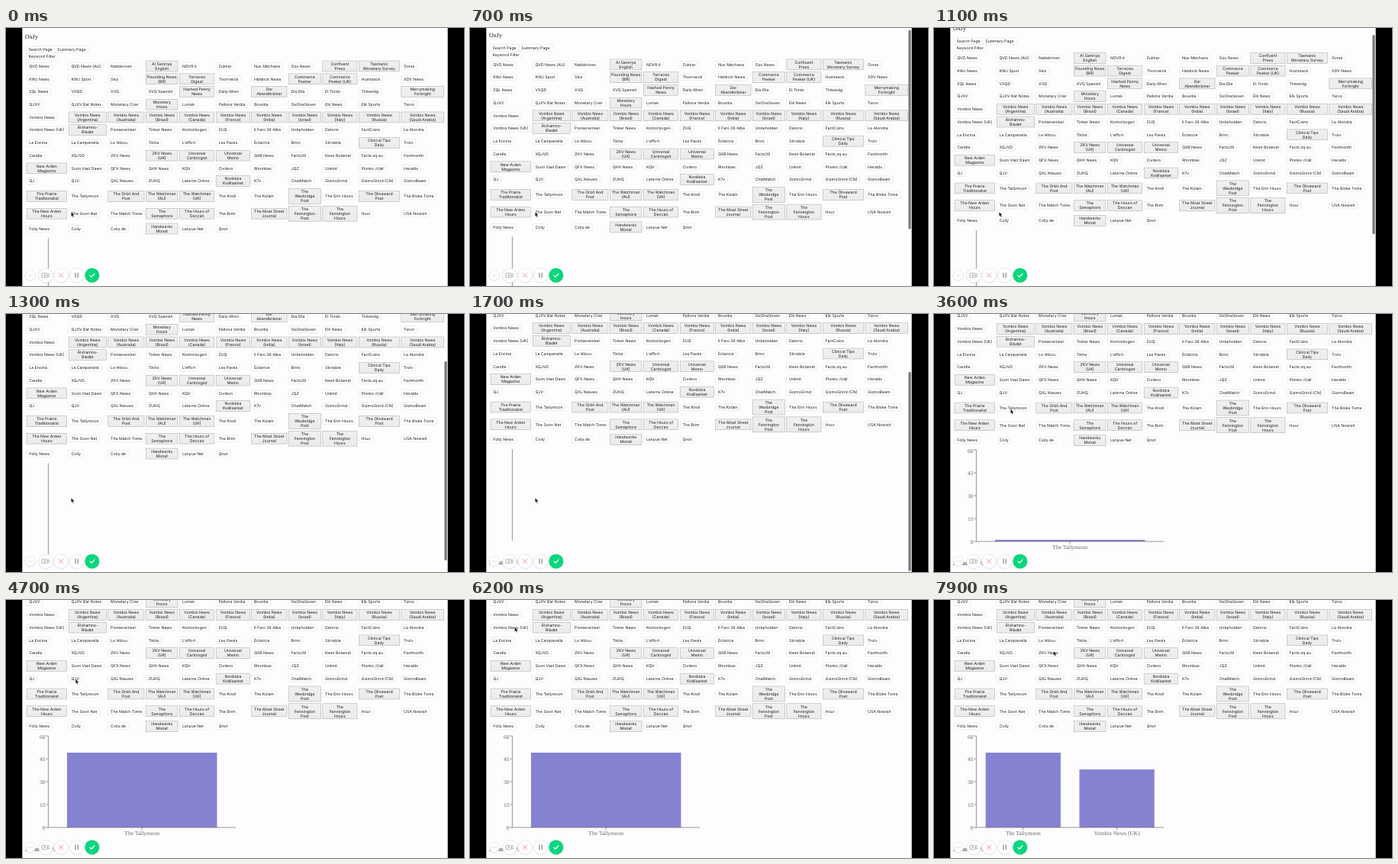
An HTML page that plays this animation: 600 by 338 pixels, repeating every 8 s.

```html
<!DOCTYPE html>
<html lang="en">
<head>
<meta charset="utf-8">
<title>News source chart</title>
<style>
  html, body { margin: 0; width: 100%; height: 100%; overflow: hidden; background: #000; }
  svg { display: block; width: 100%; height: 100%; }
  text { text-rendering: geometricPrecision; }
  .ui { font: 5.2px Inter, Roboto, sans-serif; fill: #1c1c1c; }
  .serif { font: 8px "Liberation Serif", "Noto Serif", serif; fill: #111; }
  .label { font: 7.5px "Liberation Serif", "Noto Serif", serif; fill: #666; }
  .mid { text-anchor: middle; }
  .end { text-anchor: end; }
  .flat { fill: #fff; stroke: #dadadc; stroke-width: .5; }
  .flat.pressed { fill: #8fbdf8; stroke: #6ba4ee; }
  .block { fill: url(#grey); stroke: #b2b2b4; stroke-width: .6; }
  .axis { stroke: #666; stroke-width: .7; fill: none; }
  .bar { fill: #8682d2; }
  .disc { fill: #fff; stroke: #dadade; stroke-width: .6; }
  .icon { fill: none; stroke: #8c8c8c; stroke-width: .8; stroke-linecap: round; stroke-linejoin: round; }
</style>
</head>
<body>
<svg viewBox="0 0 600 338" preserveAspectRatio="none">
  <defs>
    <linearGradient id="grey" x2="0" y2="1">
      <stop stop-color="#f0f0f1"/><stop offset="1" stop-color="#ebebed"/>
    </linearGradient>
    <clipPath id="view"><rect x="21.3" width="557.4" height="338"/></clipPath>
  </defs>
  <rect width="600" height="338"/>
  <g clip-path="url(#view)">
    <rect x="21" width="558" height="338" fill="#fdfcfe"/>
    <g id="page">
      <text class="serif" x="25" y="14">OxJy</text>
      <g id="buttons"></g>
      <path class="axis" d="M55.4 275.5v120"/>
      <g id="chart"></g>
      <text class="serif" x="25" y="426">Summary Page</text>
    </g>
    <rect id="thumb" x="574.4" width="3.2" height="261" rx="1.6" fill="#77777a"/>
  </g>
  <g id="toolbar">
    <g fill="#000" opacity=".05">
      <circle cx="32" cy="324.6" r="7.2"/><circle cx="52" cy="324.6" r="10.1"/><circle cx="72.2" cy="324.6" r="10.1"/>
      <circle cx="92.6" cy="324.6" r="10.1"/><circle cx="112.8" cy="324.6" r="10.1"/>
    </g>
    <circle class="disc" cx="32" cy="324" r="6.6"/>
    <circle class="disc" cx="52" cy="324" r="9.4"/>
    <circle class="disc" cx="72.2" cy="324" r="9.4"/>
    <circle class="disc" cx="92.6" cy="324" r="9.4"/>
    <circle cx="112.8" cy="324" r="9.5" fill="#08d67d"/>
    <path class="icon" d="M29.8 324h0M32 324h0M34.2 324h0"/>
    <path class="icon" style="stroke-width:.6" d="M47.4 321.2h6.4v5.6h-6.4zM53.8 323.4l2.8-1.6v4.4l-2.8-1.6M49.4 324h2.4m-1.2-1.2v2.4"/>
    <path class="icon" style="stroke:#f0787a" d="M69.4 321.2l5.6 5.6m0-5.6l-5.6 5.6"/>
    <path class="icon" style="stroke-width:1.3" d="M91 321.2v5.6m3.2-5.6v5.6"/>
    <path class="icon" style="stroke:#fff;stroke-width:1.3" d="M109.8 324.1l2.1 2.1 4-4.2"/>
  </g>
  <path id="cursor" d="M0 0v6l1.4-1.3 1 2.2 1.1-.5-1-2.1h1.8z" fill="#000" stroke="#fff" stroke-width=".4"/>
</svg>
<script>
const $ = id => document.getElementById(id);

function add(parent, tag, attrs, content) {
  const el = document.createElementNS("http://www.w3.org/2000/svg", tag);
  for (const key in attrs) el.setAttribute(key, attrs[key]);
  if (content !== undefined) el.textContent = content;
  return parent.appendChild(el);
}

// One row per line, cells split by ";", line breaks inside a cell by "|".
const rows = `QVD News;QVD News (AU);Nattskriven;Al Samriya|English;NOVR.it;Zulmar;Nux Mechana;Ozu News;Confluent|Press;Tasmanic|Monetary Survey;Ovrex
KWJ News;KWJ Sport;Skiz;Pounding News|(BR);Terraces|Digest;Thornwick;Haldrick News;Commerce|Peeker;Commerce|Peeker (UK);Humstack;XDV News
ZQL News;VXQD;XVQ;XVQ Spanish;Hashed Penny|News;Daily Wren;Der|Abendkrämer;Die Elle;El Tordo;Tinkwidg;Merrymaking|Fortnight
QJXV;QJXV Bat Notes;Monetary Crier;Monetary|Hours;Lumsk;Pallone Verdia;Bountia;SixOneSeven;Elk News;Elk Sports;Tarvo
Vombix News;Vombix News|(Argentina);Vombix News|(Australia);Vombix News|(Brasil);Vombix News|(Canada);Vombix News|(France);Vombix News|(India);Vombix News|(Israel);Vombix News|(Italy);Vombix News|(Russia);Vombix News|(Saudi Arabia)
Vombix News (UK);Älvhamns-|Bladet;Pionierwinkel;Tinker News;Kontorbogen;ZUQ;Il Faro 36 Albe;Unbeholden;Datorio;FactCoins;La Alondra
La Encina;La Campanella;Le Hibou;Tikha;L'effort;Les Pavés;Éclaircie;Brinc;Stirrable;Clinical Tips|Daily;Trolv
Candle;XQJVD;ZKV News;ZKV News|(UK);Universal|Cartologist;Universal|Memo;QXB News;Facts39;Keen Botanist;Facts.zq.au;Factmonth
New Arden|Magazine;Soon Vast Dawn;QFX News;QHX News;KQV;Civitero;Rhombex;JQZ;Unknit;Plonko /r/all;Heralds
QJ;QJV;QXL Nieuws;ZUHQ;Laterne Online;Nordiska|Kvällsarket;K7v;ChatMatch;GizmoGrind;GizmoGrind (CN);GizmoBeam
The Prairie|Traditionalist;The Tallymoon;The Orbit And|Post;The Watchman|(AU);The Watchman|(UK);The Knoll;The Kolam;The|Wexbridge|Post;The Erin Hours;The Oliveward|Post;The Bloke Tome
The New Arden|Hours;The Soon Net;The Match Tome;The|Semaphore;The Hours of|Deccan;The Brim;The Moat Street|Journal;The|Fennington|Post;The|Fennington|Hours;Hour;USA Nowish
Folly News;Coily;Coily.de;Handwerks|Monat;Lanyue Net;Qnot`.split("\n").map(row => row.split(";"));

const lefts = [27, 82.2, 133.8, 183.4, 227.6, 275.2, 321.6, 370.2, 414.8, 462.3, 517.8];
const rights = [79.6, 131.4, 181, 225, 272.6, 319.6, 368, 412.5, 460, 515.5, 573.5];
const rowY = i => i < 10 ? 50 + i * 16.73 : [220.5, 243.2, 263][i - 10];

function flatButton(x, y, label) {
  const box = add($("buttons"), "rect", { class: "flat", x, y: y - 4.4, height: 8.8, rx: 1.8 });
  const text = add($("buttons"), "text", { class: "ui", x: x + 3.3, y: y + 1.8 }, label);
  box.setAttribute("width", text.getComputedTextLength() + 6.6);
  return box;
}

function blockButton(x, right, y, lines) {
  const height = lines.length * 6.1 + 1.6;
  add($("buttons"), "rect", { class: "block", x, y: y - height / 2, width: right - x, height });
  lines.forEach((line, i) => add($("buttons"), "text", {
    class: "ui mid", x: (x + right) / 2, y: y + 1.8 + (i - (lines.length - 1) / 2) * 6
  }, line));
}

flatButton(26.2, 28, "Search Page");
flatButton(64, 28, "Summary Page");
flatButton(26.2, 37, "Keyword Filter");

let clicked;
rows.forEach((cells, r) => cells.forEach((cell, c) => {
  const lines = cell.split("|");
  if (lines.length > 1) return blockButton(lefts[c], rights[c], rowY(r), lines);
  const box = flatButton(lefts[c], rowY(r), cell);
  if (cell === "The Tallymoon") clicked = box;
}));

// Chart, in page coordinates.
const base = 395.5, axisX = 55.4, axisWidth = 245.6;
const data = [["The Tallymoon", 49], ["Vombix News (UK)", 38]];
const chart = $("chart");
for (let v = 0; v <= 60; v += 15) {
  const y = base - v * 2;
  add(chart, "path", { class: "axis", d: `M${axisX} ${y}h-3` });
  add(chart, "text", { class: "label end", x: 51.5, y: y + (v === 60 ? 4 : 2.7) }, v);
}
const bars = data.map(([name]) => ({
  rect: add(chart, "rect", { class: "bar" }),
  tick: add(chart, "path", { class: "axis" }),
  label: add(chart, "text", { class: "label mid", y: base + 9.8 }, name)
}));
add(chart, "path", { class: "axis", d: `M${axisX} ${base}h${axisWidth}` });

const lerp = (a, b, p) => a + (b - a) * p;
const clamp = p => Math.min(1, Math.max(0, p));

// CSS "ease" curve: cubic-bezier(.25, .1, .25, 1)
function ease(x) {
  const bezier = (a, b, u) => 3 * a * u * (1 - u) ** 2 + 3 * b * u * u * (1 - u) + u ** 3;
  let lo = 0, hi = 1;
  for (let i = 0; i < 20; i++) {
    const m = (lo + hi) / 2;
    if (bezier(.25, .25, m) < x) lo = m; else hi = m;
  }
  return bezier(.1, 1, lo);
}

// Keys are [time, value, value, ...], linear in between.
function track(keys, t) {
  const i = keys.findIndex(k => k[0] > t);
  if (i === 0) return keys[0].slice(1);
  if (i < 0) return keys[keys.length - 1].slice(1);
  const a = keys[i - 1], b = keys[i];
  return a.slice(1).map((v, j) => lerp(v, b[j + 1], (t - a[0]) / (b[0] - a[0])));
}

const scrollKeys = [[500, 0], [600, .8], [700, 2.1], [1100, 10.6], [1200, 38], [1300, 80], [1400, 99],
  [1600, 99], [1700, 98.4], [2000, 97.5]];
const thumbKeys = [[500, 0], [600, .6], [700, 1], [2000, 1], [2400, 0]];
const cursorKeys = [[1900, 85.3, 241], [2400, 99.8, 124], [2500, 99.8, 124], [2600, 100.3, 124.6],
  [4600, 100.3, 124.6], [4900, 72.8, 61.6], [5300, 72.8, 61.6], [5700, 62.5, 40.6],
  [5900, 62.5, 40.6], [6200, 58.6, 35.6], [7100, 58.6, 35.6], [7600, 156, 67.4],
  [7800, 156, 67.4], [7900, 156.4, 66.9]];
const firstBar = 3582, secondBar = 6782, growTime = 480;

function drawBars(t) {
  chart.style.display = t < 3600 ? "none" : "";
  const count = t < 6800 ? 1 : 2;
  const grow = [firstBar, secondBar].map(start => ease(clamp((t - start) / growTime)));
  const split = count === 2 ? grow[1] : 0;
  bars.forEach(({ rect, tick, label }, i) => {
    const shown = i < count ? "" : "none";
    for (const el of [rect, tick, label]) el.style.display = shown;
    const band = axisWidth / count;
    const center = axisX + band * (i + .5);
    const inset = width => axisX + width * (i + .1);
    const half = axisWidth / 2;
    const height = data[i][1] * 2 * grow[i];
    rect.setAttribute("x", i ? inset(half) : lerp(inset(axisWidth), inset(half), split));
    rect.setAttribute("width", .8 * (i ? half : lerp(axisWidth, half, split)));
    rect.setAttribute("y", base - height);
    rect.setAttribute("height", height);
    tick.setAttribute("d", `M${center} ${base}v3`);
    label.setAttribute("x", center);
  });
}

function draw(now) {
  const t = Math.floor(now % 8000 / 100) * 100; // ten poses a second
  const [scroll] = track(scrollKeys, t);
  const [x, y] = track(cursorKeys, t);
  $("page").setAttribute("transform", `translate(0 ${-scroll})`);
  $("thumb").setAttribute("y", 1 + scroll * .76);
  $("thumb").setAttribute("opacity", track(thumbKeys, t)[0]);
  $("cursor").setAttribute("transform", `translate(${x} ${y})`);
  clicked.classList.toggle("pressed", t === 3200);
  drawBars(t);
}

const start = performance.now();
function loop() {
  draw(performance.now() - start);
  requestAnimationFrame(loop);
}
loop();
</script>
</body>
</html>
```
